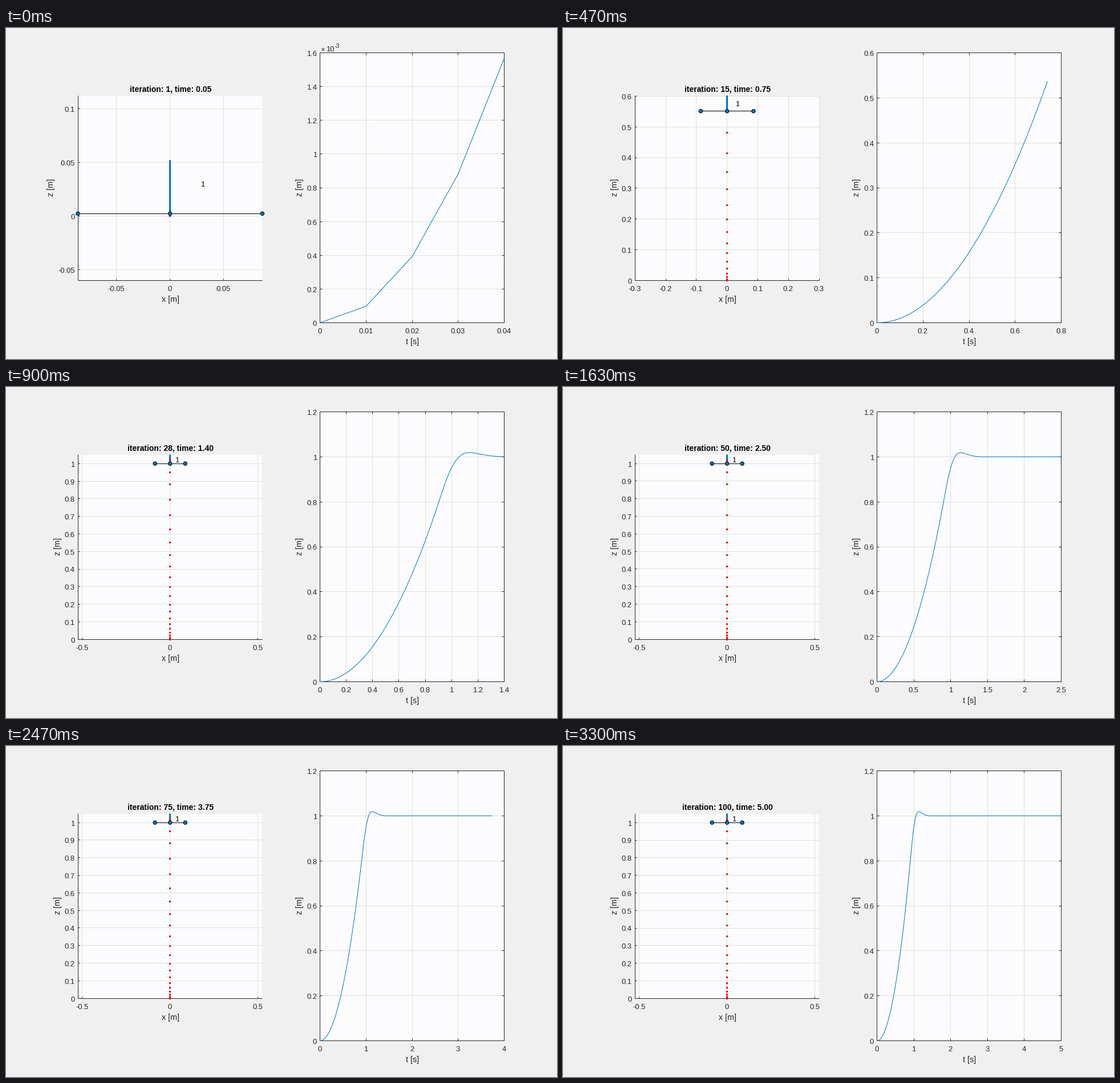
Animation of 966 by 580 pixels, one loop 3330 ms. Source, as a matplotlib script:

```python
import math

import numpy as np
import matplotlib.pyplot as plt
from matplotlib.animation import FuncAnimation
from matplotlib.patches import Circle, Rectangle

W, H, DPI = 966, 580, 100
PX = 72 / DPI                      # points per pixel
POSES, TICK_MS, LOOP_MS = 100, 10, 3330

INK, GRID, BLUE = "#262626", "#dfdfdf", "#0072bd"
ARM, STEM = 0.086, 0.05
SCENE = (126.0, 118.8, 449.4, 442.2)   # left, top, right, bottom in pixels
CHART = (550.5, 43.5, 873.5, 516.5)

# Flight: full thrust, braking, then a damped settling on the set height
UP, DOWN, T1, T2 = 1.96, 9.81, 0.93, 1.085
OMEGA, ZETA = 14, 0.8


def height(t):
    t = np.asarray(t, float)
    climb = UP * t ** 2 / 2
    z1, v1, d = UP * T1 ** 2 / 2, UP * T1, T2 - T1
    brake = z1 + v1 * (t - T1) - DOWN * (t - T1) ** 2 / 2
    e, v = z1 + v1 * d - DOWN * d ** 2 / 2 - 1, v1 - DOWN * d
    decay, wd = ZETA * OMEGA, OMEGA * math.sqrt(1 - ZETA ** 2)
    s = np.maximum(t - T2, 0)
    settle = 1 + np.exp(-decay * s) * (
        e * np.cos(wd * s) + (v + decay * e) / wd * np.sin(wd * s))
    return np.where(t < T1, climb, np.where(t < T2, brake, settle))


def steps():
    for power in range(-5, 2):
        for base in (1, 2, 5):
            yield base * 10.0 ** power


def ticks(lo, hi, step):
    first, last = math.ceil(lo / step - 1e-6), math.floor(hi / step + 1e-6)
    return [round(k * step, 7) + 0.0 for k in range(first, last + 1)]


def fit_ticks(lo, hi, most, least_step=0):
    for step in steps():
        if step >= least_step * 0.999:
            found = ticks(lo, hi, step)
            if len(found) <= most:
                return found


def round_limit(top):
    """Upper limit and tick step for an axis that starts at zero."""
    finer = None
    for step in steps():
        n = math.ceil(top / step - 1e-6)
        if n <= 7:
            if top / (n * step) < 0.8:
                step = finer
                n = math.ceil(top / step - 1e-6)
            return n * step, step
        finer = step


fig = plt.figure(figsize=(W / 100, H / 100), dpi=DPI, facecolor="#f0f0f0")
ax = fig.add_axes([0, 0, 1, 1])
ax.set_xlim(0, W)
ax.set_ylim(H, 0)
ax.axis("off")
for x0, y0, x1, y1 in (SCENE, CHART):
    ax.add_patch(Rectangle((x0, y0), x1 - x0, y1 - y0, fc="#fcfcfe", lw=0))

drawn = []                         # artists of the current pose


def line(xs, ys, color=INK, width=1, z=2):
    drawn.extend(ax.plot(xs, ys, color=color, lw=width * PX, zorder=z,
                         solid_capstyle="butt", solid_joinstyle="round"))


def straight(xs, ys, *args, **kw):
    """Level or upright line; snapping rounds up, so step back half a pixel."""
    line(np.array(xs) - 0.5, np.array(ys) - 0.5, *args, **kw)


def upright(xs, y0, y1, color=INK, z=2):
    drawn.append(ax.vlines(np.array(xs) - 0.5, y0 - 0.5, y1 - 0.5,
                           colors=color, lw=PX, zorder=z))


def level(ys, x0, x1, color=INK, z=2):
    drawn.append(ax.hlines(np.array(ys) - 0.5, x0 - 0.5, x1 - 0.5,
                           colors=color, lw=PX, zorder=z))


def label(x, y, text, size=13, color=INK, ha="center", va="baseline", **kw):
    drawn.append(ax.text(x, y, text, fontsize=size * PX, color=color, ha=ha,
                         va=va, family="Liberation Sans", zorder=6, **kw))


def text_width(text, size=13):
    return size * sum({".": 0.278, "-": 0.333}.get(c, 0.556) for c in text)


def draw_axes(box, to_x, to_y, xt, yt, names, tick, closed, unit=1):
    x0, y0, x1, y1 = box
    xs, ys = [to_x(v) for v in xt], [to_y(v) for v in yt]
    upright(xs, y0, y1, GRID, z=1)
    level(ys, x0, x1, GRID, z=1)
    upright(xs, y1, y1 - tick)
    level(ys, x0, x0 + tick)
    straight([x0, x0, x1], [y0, y1, y1])
    if closed:
        upright(xs, y0, y0 + tick)
        level(ys, x1, x1 - tick)
        straight([x0, x1, x1], [y0, y0, y1])

    for x, v in zip(xs, xt):
        label(x - 0.3, y1 + 18.4, f"{v:g}")
    texts = [f"{round(v / unit, 6):g}" for v in yt]
    for y, text in zip(ys, texts):
        label(x0 - 5.3, y + 5.4, text, ha="right")
    widest = max(text_width(text) for text in texts)
    label((x0 + x1) / 2 + 0.8, y1 + 37.4, names[0], 14.2)
    label(x0 - 5.3 - widest - 11.7, (y0 + y1) / 2 - 1, names[1], 14.2,
          va="center", rotation=90)


def draw_scene(count):
    x0, y0, x1, y1 = SCENE
    now = 0.05 * count
    trail = height(0.05 * np.arange(count + 1))
    z = float(trail[-1])
    top = max(z + STEM, trail.max())
    span = max(2 * ARM, top)
    low = (top - span) / 2
    scale = (x1 - x0) / span
    mid = (x0 + x1) / 2

    def to_x(v):
        return mid + v * scale

    def to_y(v):
        return y1 - (v - low) * scale

    half = span / 2
    xt = fit_ticks(-half, half, 7, 0.5 if half >= 0.5 else 0)
    zt = fit_ticks(low, low + span, 11, 0.05 if span < 0.2 else 0)
    draw_axes(SCENE, to_x, to_y, xt, zt, ("x [m]", "z [m]"), 3, False)

    y = to_y(z)
    straight([mid, mid], [y, to_y(z + STEM)], BLUE, 3, z=3)
    straight([to_x(-ARM), to_x(ARM)], [y, y], "black", z=3)
    drawn.extend(ax.plot([mid - 0.5] * len(trail), to_y(trail) - 0.5, "s",
                         ms=3 * PX, mfc="red", mew=0, zorder=4))
    for v in (-ARM, 0, ARM):
        drawn.append(ax.add_patch(Circle((to_x(v), y), 3.2, fc=BLUE,
                                         ec="black", lw=PX, zorder=5)))
    offset = ARM / 3 * scale
    label(mid + offset + 3, y - offset + 6.9, "1", color="black")
    label(mid + 0.6, 111.2, f"iteration: {count}, time: {now:.2f}", 13.9,
          "black", weight="bold")


def draw_chart(count):
    x0, y0, x1, y1 = CHART
    t = 0.01 * np.arange(5 * count)
    z = height(t)
    t_end, t_step = round_limit(t[-1])
    z_end, z_step = round_limit(z.max())

    def to_x(v):
        return x0 + v / t_end * (x1 - x0)

    def to_y(v):
        return y1 - v / z_end * (y1 - y0)

    small = z_end < 0.0099
    draw_axes(CHART, to_x, to_y, ticks(0, t_end, t_step),
              ticks(0, z_end, z_step), ("t [s]", "z [m]"), 4, True,
              0.001 if small else 1)
    if small:
        label(551.5, 41, "×", ha="left")
        label(561, 41, "10", ha="left")
        label(575.5, 35, "-3", 10.5, ha="left")
    line(to_x(t), to_y(z), BLUE, z=3)


shown = None


def update(k):
    """Each pose lasts 30, 40 or 30 ms, counted in ticks of 10 ms."""
    global shown
    pose = (3 * k + 1) // 10 % POSES
    if pose != shown:
        while drawn:
            drawn.pop().remove()
        draw_scene(pose + 1)
        draw_chart(pose + 1)
        shown = pose
    return []


anim = FuncAnimation(fig, update, frames=LOOP_MS // TICK_MS, interval=TICK_MS,
                     repeat=True, repeat_delay=0, blit=False)
plt.show()
```
